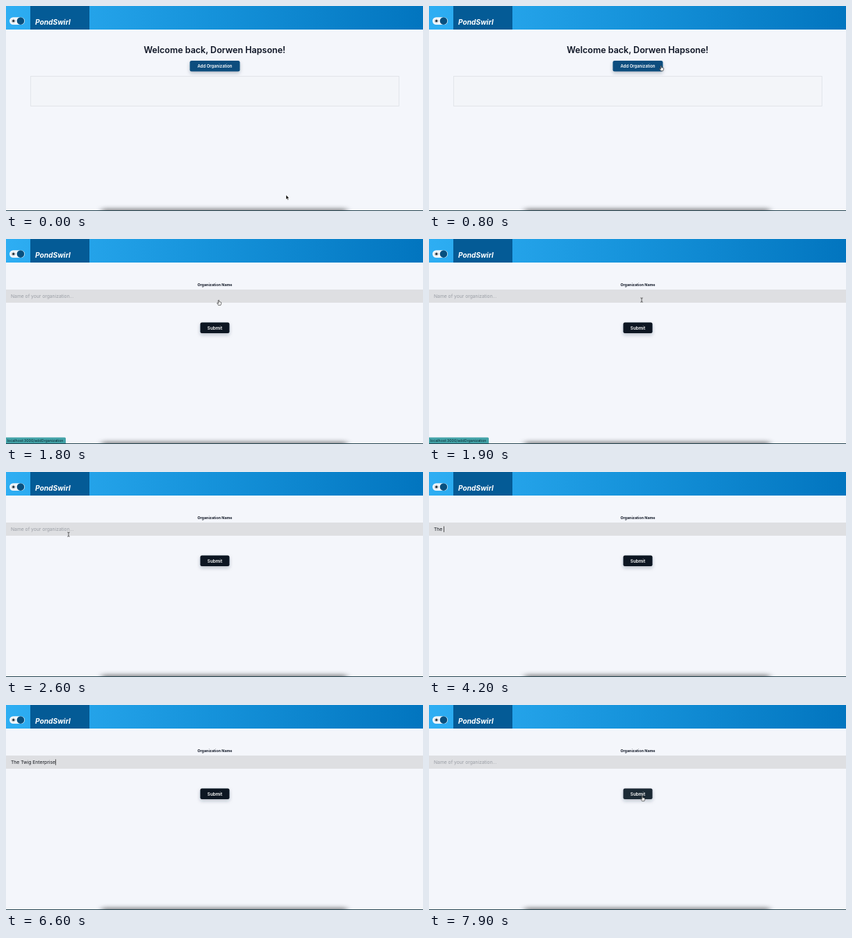
Recreate the animation shown at these times as an HTML page. Size 600 px wide and 296 px high, loop 8 s.

```html
<!DOCTYPE html>
<html lang="en">
<head>
<meta charset="utf-8">
<title>Add organization</title>
<style>
  html, body { margin: 0; width: 100%; height: 100%; overflow: hidden; background: #f4f6fb; }
  svg { display: block; width: 600px; height: 296px; }
  text { font-family: Inter, "Liberation Sans", sans-serif; }
  .mid { text-anchor: middle; }
  .bold { font-weight: 600; }
  .field { font-size: 6.75px; white-space: pre; }
  .btn { fill: #fff; font-weight: 600; }
</style>
</head>
<body>
<svg viewBox="0 0 600 296">
  <defs>
    <linearGradient id="sky">
      <stop offset="0" stop-color="#2eaef3"/>
      <stop offset=".5" stop-color="#1592da"/>
      <stop offset="1" stop-color="#0275bf"/>
    </linearGradient>
    <filter id="soft" x="-30%" y="-60%" width="160%" height="250%">
      <feDropShadow dx="0" dy="2.5" stdDeviation="2.4" flood-color="#1b2a40" flood-opacity=".27"/>
    </filter>
    <filter id="blur" x="-10%" y="-200%" width="120%" height="500%"><feGaussianBlur stdDeviation="5 3"/></filter>
  </defs>

  <rect width="600" height="296" fill="#f4f6fb"/>
  <rect x="138" y="293" width="352" height="12" fill="#000" opacity=".5" filter="url(#blur)"/>
  <rect y="295" width="600" height="1" fill="#24434f"/>

  <rect width="600" height="34" fill="url(#sky)"/>
  <rect x="35" width="85" height="34" fill="#045b96"/>
  <text x="42" y="27.3" font-size="10.2" font-weight="700" font-style="italic" fill="#fff">PondSwirl</text>
  <rect x="5" y="16.2" width="22" height="10.8" rx="5.4" fill="#f1f6fa"/>
  <circle cx="21" cy="21.6" r="5.3" fill="#07507f"/>
  <circle cx="10.7" cy="21.6" r="1.5" fill="#16222c"/>
  <circle cx="10.7" cy="21.6" r="2.3" fill="none" stroke="#16222c" stroke-width=".8" stroke-dasharray=".7 1.106"/>

  <g id="home">
    <text class="mid bold" x="300.2" y="68" font-size="12.5" fill="#0d1424">Welcome back, Dorwen Hapsone!</text>
    <rect id="add" x="264.5" y="79" width="72" height="15.6" rx="2.5" filter="url(#soft)"/>
    <text class="mid btn" x="300.5" y="88.9" font-size="5.95">Add Organization</text>
    <rect x="35.5" y="101.5" width="530" height="43" fill="#f3f5f9" stroke="#e0e3e8" stroke-width=".9"/>
  </g>

  <g id="form">
    <text class="mid" x="300.5" y="68.1" font-size="5.35" font-weight="700" fill="#111827">Organization Name</text>
    <rect y="73" width="600" height="19" fill="#dedfe2"/>
    <text id="hint" class="field" x="7" y="85.2" fill="#9a9ea5">Name of your organization...</text>
    <text id="typed" class="field" x="7" y="85.2" fill="#15181e" xml:space="preserve"></text>
    <rect id="caret" y="78.4" width=".7" height="8.4" fill="#111"/>
    <rect id="submit" x="279.5" y="120.5" width="42" height="15.6" rx="2.5" filter="url(#soft)"/>
    <text class="mid btn" x="300.5" y="130.6" font-size="6.25">Submit</text>
  </g>

  <g id="status">
    <path d="M0 286.5H84.5Q86 286.5 86 288V295H0Z" fill="#43a3a8"/>
    <text x="1.8" y="292.9" font-size="5.3" fill="#0c2b33">localhost:3000/addOrganization</text>
  </g>

  <g id="pointer" stroke-linejoin="round" stroke-linecap="round">
    <path id="arrow" d="M0 0V6.2L1.5 5L2.5 7.2L3.5 6.8L2.5 4.6H4.5Z" fill="#000" stroke="#fff" stroke-width=".5"/>
    <path id="hand" d="M-.7 .6Q0-.3 .6 .6V3Q1.3 2.5 1.8 3.2Q2.5 2.8 2.9 3.5Q3.7 3.3 3.7 4.2Q3.7 6 2.8 7.7H-.6Q-1.2 6.3-2.3 5Q-2.5 4 -1.5 4.3L-.7 5Z" fill="#fff" stroke="#111" stroke-width=".6"/>
    <path id="beam" d="M-1.3-3Q0-3 0-2.3Q0-3 1.3-3M0-2.3V2.5M-1.3 3.2Q0 3.2 0 2.5Q0 3.2 1.3 3.2" fill="none" stroke="#222" stroke-width=".7"/>
  </g>
</svg>
<script>
const LOOP = 8000, STEP = 100;
const CLICK_ADD = 1800, FOCUS = 3000, TYPE = 3900, MOVE = 6900, CLICK_SUBMIT = 7700, CLEAR = 7900;
const $ = id => document.getElementById(id);
const show = (id, on) => $(id).style.display = on ? "" : "none";

// time, x, y of the pointer's hot spot
const path = [
  [0, 403, 273], [100, 432, 228], [200, 448, 167], [300, 448, 167],
  [600, 367, 83], [700, 367, 83], [800, 334, 86], [900, 334, 86],
  [1000, 318, 88], [1200, 306.5, 87.3], [1900, 306, 88],
  [2200, 226, 92], [2500, 114, 90], [2600, 90, 90], [3000, 88, 89.5],
  [6900, 92, 89.5], [7200, 198, 112], [7500, 296, 129], [7700, 307, 131]
];

// typing time and the letters it adds
const keys = [
  [3900, "T"], [4000, "h"], [4100, "e"], [4200, " "],
  [4400, "T"], [4600, "w"], [4700, "i"], [4900, "g"], [5000, " "],
  [5600, "E"], [5800, "n"], [5900, "te"], [6000, "r"],
  [6200, "p"], [6300, "ri"], [6400, "s"], [6600, "e"], [6700, "s"]
];

function pointerAt(t) {
  const i = path.findIndex(p => p[0] > t);
  if (i < 0) return path.at(-1).slice(1);
  const [t0, x0, y0] = path[i - 1], [t1, x1, y1] = path[i];
  const k = (t - t0) / (t1 - t0);
  return [x0 + (x1 - x0) * k, y0 + (y1 - y0) * k];
}

function blend(from, to, k) {
  k = Math.min(1, Math.max(0, k));
  return `rgb(${from.map((v, i) => Math.round(v + (to[i] - v) * k))})`;
}

function pointerShape(t, y) {
  if (t >= TYPE && t < MOVE) return "";
  if (t < 800) return "arrow";
  if (t <= CLICK_ADD) return "hand";
  if (t < MOVE || y < 93) return "beam";
  return t >= 7400 ? "hand" : "arrow";
}

function draw(t) {
  show("home", t < CLICK_ADD);
  show("form", t >= CLICK_ADD);
  show("status", t >= 1000 && t < 2300);
  $("add").setAttribute("fill", blend([8, 78, 126], [27, 35, 54], (t - 900) / 300));
  $("submit").setAttribute("fill", blend([11, 18, 32], [30, 41, 54], (t - 7300) / 300));

  const done = keys.filter(k => k[0] <= t);
  const value = t < CLEAR ? done.map(k => k[1]).join("") : "";
  $("typed").textContent = value;
  show("hint", !value);

  const since = t - (done.length ? done.at(-1)[0] : FOCUS);
  const lit = t >= FOCUS && t < CLICK_SUBMIT && Math.floor(since / 500) % 2 === 0;
  show("caret", lit);
  if (lit) $("caret").setAttribute("x", 7 + (value ? $("typed").getComputedTextLength() : 0));

  const [x, y] = pointerAt(t), shape = pointerShape(t, y);
  $("pointer").setAttribute("transform", `translate(${x} ${y})`);
  for (const id of ["arrow", "hand", "beam"]) show(id, id === shape);
}

const start = performance.now();
function tick() {
  const t = (performance.now() - start) % LOOP;
  draw(Math.floor(t / STEP) * STEP);
  requestAnimationFrame(tick);
}
tick();
</script>
</body>
</html>
```
